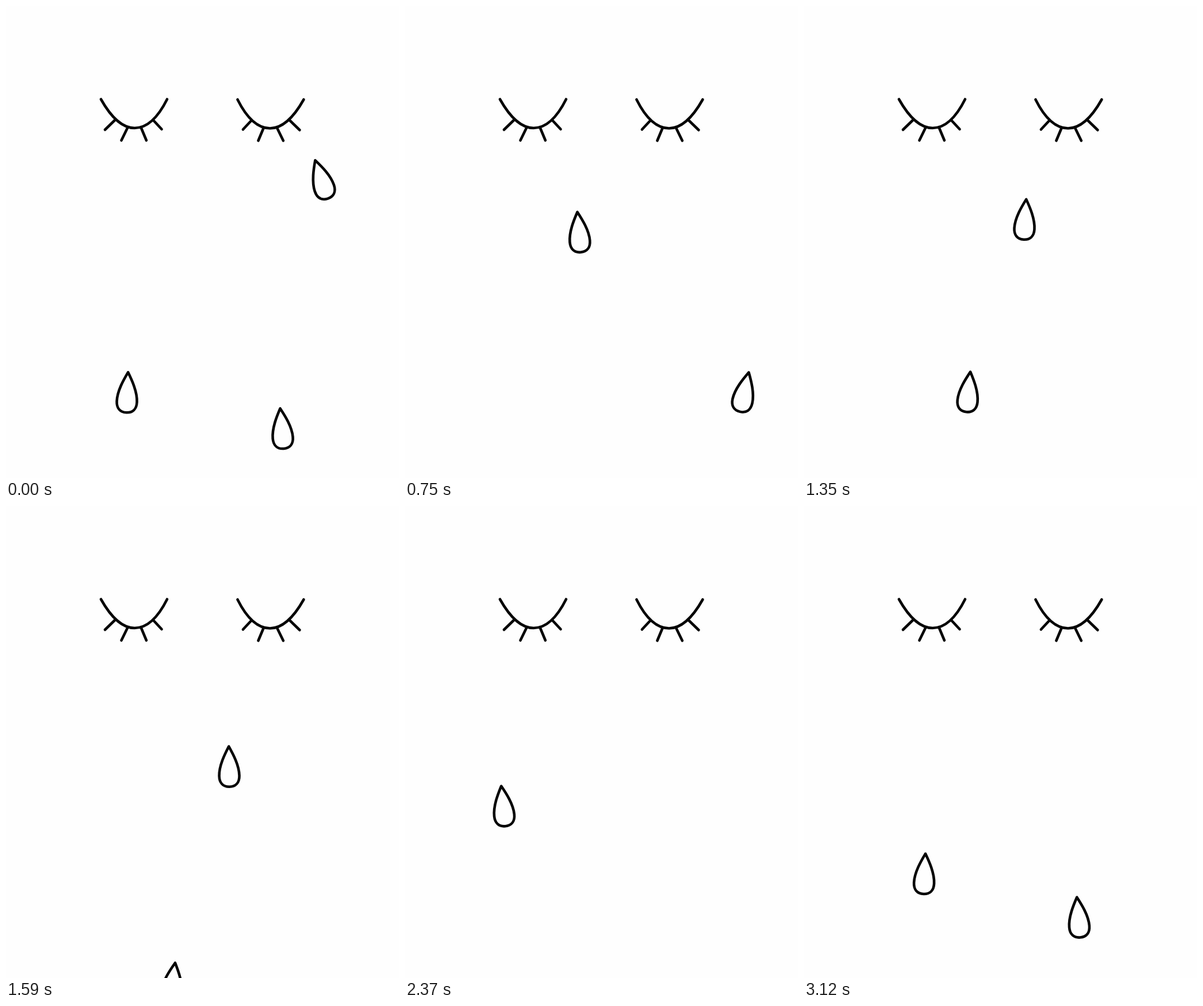
Animation of 683x820 px, one loop 3.15 s. Source, as an HTML page with a canvas:

```html
<!DOCTYPE html>
<html lang="en">
<head>
<meta charset="utf-8">
<title>Tears</title>
<style>
html, body { margin: 0; width: 100%; height: 100%; overflow: hidden; background: #fefefe; }
canvas { display: block; }
</style>
</head>
<body>
<canvas id="stage" width="683" height="820"></canvas>
<script>
const ctx = document.getElementById('stage').getContext('2d');
const LOOP = 3150, STEP = 30;
const SWAY = Math.PI / 1100;  // radians per ms
const BELLY = 50;             // from the tip to the widest part

const eye = new Path2D(
  'M165 162C174 178 195 212 223.5 212C252 212 271 180 280 162' +
  'M189.5 198L172 215M211 212L200.5 233.5M235 212L244 233.5M256.5 199L270.5 214');
const drop = new Path2D(
  'M0 0C-7 13 -17.5 33 -17.5 51C-17.5 63 -11 70 0 70' +
  'C11 70 17.5 63 17.5 51C17.5 33 7 13 0 0Z');

// Each tear falls from y with speed v and pull g, and sways around x.
// It is furthest left at age `low` and stands straight at age `up`.
const tears = [
  { start: 0, y: 265.6, v: .343, g: .0002, x: 553, amp: 40, low: -550, tilt: 18.5, up: 490 },
  { start: 360, y: 267.4, v: .141, g: .000233, x: 294, amp: 10.3, low: 1052, rate: 1.83, tilt: 7, up: 660 },
  { start: 1020, y: 256, v: .184, g: .000175, x: 400.7, amp: 17.7, low: 300, tilt: -7, up: 520 },
  { start: 1890, y: 277.5, v: .243, g: .0004, x: 203.5, amp: 46, low: 190, tilt: -10.5, up: 270 },
  { start: 2430, y: 320.5, v: .399, g: .000176, x: 490, amp: 32, low: 270, tilt: -7, up: 430 },
  { start: 2760, y: 349, v: .37, g: .00094, x: 249, amp: 43, low: 236, tilt: -5, up: 560 }
];

function drawTear({ start, y, v, g, x, amp, low, rate = 1, tilt, up }, time) {
  const age = (time - start + LOOP) % LOOP;
  const top = y + v * age + g * age * age;
  if (top > 825) return;
  ctx.save();
  ctx.translate(x - amp * Math.cos(SWAY * rate * (age - low)), top + BELLY);
  ctx.rotate(tilt * Math.sin(SWAY * (age - up)) * Math.PI / 180);
  ctx.translate(0, -BELLY);
  ctx.stroke(drop);
  ctx.restore();
}

function draw(time) {
  ctx.fillStyle = '#fefefe';
  ctx.fillRect(0, 0, 683, 820);
  ctx.strokeStyle = '#050505';
  ctx.lineWidth = 4.6;
  ctx.lineCap = ctx.lineJoin = 'round';
  ctx.stroke(eye);
  ctx.save();
  ctx.translate(682.4, .5);
  ctx.scale(-1, 1);
  ctx.stroke(eye);
  ctx.restore();
  tears.forEach(tear => drawTear(tear, time));
}

let begin;
function tick(now) {
  begin ??= now;
  draw(Math.floor((now - begin) % LOOP / STEP) * STEP);
  requestAnimationFrame(tick);
}
draw(0);
requestAnimationFrame(tick);
</script>
</body>
</html>
```
